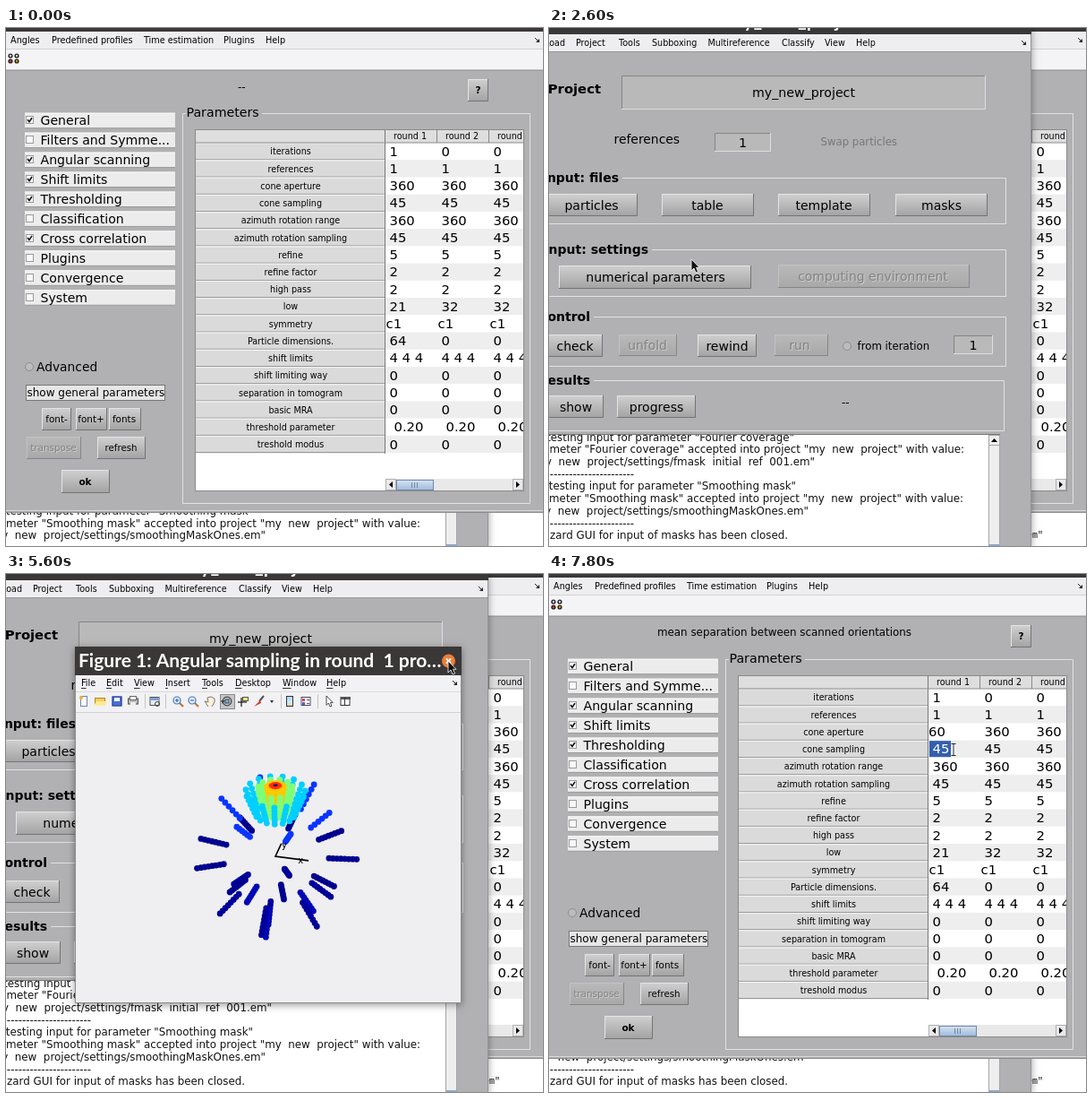
Recreate the animation shown at these times as an HTML page with a canvas. Size 600 px wide and 578 px high, loop 8 s.

```html
<!DOCTYPE html>
<html lang="en">
<head>
<meta charset="utf-8">
<title>Angular sampling</title>
<style>
html, body { margin: 0; width: 100%; height: 100%; overflow: hidden; background: #b1b1b1; }
canvas { display: block; }
</style>
</head>
<body>
<canvas id="stage" width="600" height="578"></canvas>
<script>
const c = document.getElementById('stage').getContext('2d');
const LOOP = 8000, STEP = 200;
const SANS = '"DejaVu Sans", sans-serif', TITLE = 'bold 21px Lato, sans-serif';
const GRAY = '#b1b0b2', BLUE = '#335fae', BAR = '#3a3737', MENU = '#eeedf0';

function box(x, y, w, h, fill) { c.fillStyle = fill; c.fillRect(x, y, w, h); }
function frame(x, y, w, h, color) { c.strokeStyle = color; c.lineWidth = 1; c.strokeRect(x + .5, y + .5, w - 1, h - 1); }
function line(color, width, ...p) {
  c.strokeStyle = color; c.lineWidth = width;
  c.beginPath();
  for (let i = 0; i < p.length; i += 2) c.lineTo(p[i], p[i + 1]);
  c.stroke();
}
function shape(color, ...p) {
  c.fillStyle = color;
  c.beginPath();
  for (let i = 0; i < p.length; i += 2) c.lineTo(p[i], p[i + 1]);
  c.fill();
}
function dot(x, y, r, color) { c.fillStyle = color; c.beginPath(); c.arc(x, y, r, 0, 7); c.fill(); }
function ring(x, y, r, color, width = 1) { c.strokeStyle = color; c.lineWidth = width; c.beginPath(); c.arc(x, y, r, 0, 7); c.stroke(); }
function clip(x, y, w, h, draw) { c.save(); c.beginPath(); c.rect(x, y, w, h); c.clip(); draw(); c.restore(); }
function pane(x, y, w, h, fill) {
  c.save();
  c.shadowColor = 'rgba(0,0,0,.4)'; c.shadowBlur = 8; c.shadowOffsetY = 2;
  box(x, y, w, h, fill);
  c.restore();
}

// y is the visual middle of the line
function text(s, x, y, size, align = 'left', color = '#000', weight = '') {
  c.font = `${weight} ${size}px ${SANS}`;
  c.textAlign = align; c.fillStyle = color;
  c.fillText(s, x, y + size * .36);
}
function button(label, x, y, w, h, size, mid, off, weight) {
  const g = c.createLinearGradient(0, y, 0, y + h);
  g.addColorStop(0, off ? '#b9b9b9' : '#d0d0d0');
  g.addColorStop(1, off ? '#a8a8a8' : '#a2a2a2');
  box(x, y, w, h, g);
  line(off ? '#c2c2c2' : '#e4e4e4', 1, x + .5, y + h, x + .5, y + .5, x + w, y + .5);
  line(off ? '#868686' : '#747474', 1, x + w - .5, y, x + w - .5, y + h - .5, x, y + h - .5);
  if (off) text(label, mid + 1, y + h / 2 + 1, size, 'center', '#cecece');
  text(label, mid, y + h / 2, size, 'center', off ? '#838383' : '#000', weight);
}
function field(label, x, y, w, h) {
  box(x, y, w, h, '#b9b9b9');
  line('#858585', 1, x + .5, y + h, x + .5, y + .5, x + w, y + .5);
  line('#dedede', 1, x + w - .5, y, x + w - .5, y + h - .5, x, y + h - .5);
  text(label, x + w / 2, y + h / 2, 14.2, 'center');
}
function dockArrow(x, y) { line('#222', 1, x - 3, y - 3, x + 1, y + 1); shape('#222', x + 2, y - 2, x + 2, y + 2, x - 2, y + 2); }
function radio(x, y) { dot(x, y, 4.5, '#bcbcbc'); ring(x, y, 4.5, '#8e8e8e'); }

const PANELS = ['General', 'Filters and Symme...', 'Angular scanning', 'Shift limits', 'Thresholding',
  'Classification', 'Cross correlation', 'Plugins', 'Convergence', 'System'];
const CHECKED = [0, 2, 3, 4, 6];
const ROWS = [
  ['iterations', '1', '0'], ['references', '1', '1'], ['cone aperture', '360', '360'], ['cone sampling', '45', '45'],
  ['azimuth rotation range', '360', '360'], ['azimuth rotation sampling', '45', '45'], ['refine', '5', '5'],
  ['refine factor', '2', '2'], ['high pass', '2', '2'], ['low', '21', '32'], ['symmetry', 'c1', 'c1'],
  ['Particle dimensions.', '64', '0'], ['shift limits', '4 4 4', '4 4 4'], ['shift limiting way', '0', '0'],
  ['separation in tomogram', '0', '0'], ['basic MRA', '0', '0'], ['threshold parameter', '0.20', '0.20'],
  ['treshold modus', '0', '0']];
const ROW_H = 19.22;

function paramCell(t, r, col) {
  const y = 137.5 + r * ROW_H, v = ROWS[r][col ? 2 : 1];
  const left = 424 + col * 58;
  if (!col && r === 2 && t >= 7000) {
    const s = t < 7200 ? '360' : t < 7400 ? '6' : '60';
    if (t < 7200) box(425, y - 9, 30, 18, BLUE);
    return text(s, left, y, 14.8, 'left', t < 7200 ? '#fff' : '#000');
  }
  const picked = !col && r === 3 && t >= 7800;
  if (picked) box(425, y - 9, 24, 18, BLUE);
  const pad = v === 'c1' ? .5 : v === '0.20' ? 9.5 : 4.5;
  text(v, left + pad, y, 14.8, 'left', picked ? '#fff' : '#000');
}

function paramTable(t) {
  box(212, 113, 367, 404, '#fff');
  box(212, 114, 366, 14, '#dedede');
  for (let r = 0; r < ROWS.length; r++) {
    const y = 128 + r * ROW_H;
    if (r % 2) box(424, y, 154, ROW_H, '#eeeeee');
    box(212, y, 211, ROW_H, '#dadada');
    line('#f6f6f6', 1, 212, y + .8, 423, y + .8);
    line('#8b8b8b', 1, 212, y + ROW_H - .3, 423, y + ROW_H - .3);
    text(ROWS[r][0], 318, y + 10, 9.6, 'center');
  }
  line('#777', 1, 423.5, 114, 423.5, 475);
  line('#8b8b8b', 1, 212, 128, 578, 128);
  clip(424, 113, 154, 390, () => {
    for (let k = 0; k < 3; k++) {
      text('round ' + (k + 1), 433 + k * 58, 121, 9.6);
      line('#888', 1, 481.5 + k * 58, 114, 481.5 + k * 58, 128);
      for (let r = 0; r < ROWS.length; r++) paramCell(t, r, k);
    }
  });
  box(424, 503, 154, 13, '#e9e9e9');
  const g = c.createLinearGradient(0, 504, 0, 516);
  g.addColorStop(0, '#d8e4f2'); g.addColorStop(1, '#9db9dc');
  box(436, 504, 42, 12, g); frame(436, 504, 42, 12, '#7088a8');
  for (let i = 0; i < 3; i++) line('#7088a8', 1, 453.5 + i * 3, 507, 453.5 + i * 3, 513);
  frame(424, 503, 12, 13, '#b0b0b0'); frame(566, 503, 12, 13, '#b0b0b0');
  shape('#000', 432, 506, 432, 513, 428, 509.5);
  shape('#000', 570, 506, 570, 513, 574, 509.5);
  frame(211, 113, 368, 404, '#8a8a8a');
}

function paramWindow(t) {
  box(0, 0, 600, 541, GRAY);
  box(0, 0, 600, 4, BAR);
  box(0, 4, 600, 19, MENU);
  box(0, 23, 600, 24, '#f4f3f6');
  line('#d2d2d2', 1, 0, 23.5, 600, 23.5);
  line('#8e8e8e', 1, 0, 47, 600, 47);
  [['Angles', 5], ['Predefined profiles', 51], ['Time estimation', 154], ['Plugins', 243], ['Help', 290]]
    .forEach(m => text(m[0], m[1], 13.5, 9.7));
  dockArrow(594, 14);
  for (let k = 0; k < 4; k++) {
    const x = 5 + k % 2 * 7, y = 31 + (k >> 1) * 6;
    dot(x, y, 2.6, '#222'); dot(x, y, 1.2, ['#ddd', '#ddd', '#e33', '#e90'][k]);
  }
  if (t >= 7800) text('mean separation between scanned orientations', 121, 65, 11.86);
  else text('--', 259, 66, 12);
  button('?', 516, 57, 23, 25, 10.5, 527.5, false, 'bold');

  line('#e2e2e2', 1, 201, 95.5, 197.5, 95.5, 197.5, 530.5, 585.5, 530.5, 585.5, 95.5, 286, 95.5);
  text('Parameters', 201.5, 94, 14.2);
  PANELS.forEach((s, i) => {
    const y = 103.2 + i * 21.95;
    box(21, y - 8.5, 168, 17, '#ececec');
    line('#fafafa', 1, 21, y - 8, 189, y - 8);
    line('#999', 1, 21, y + 8.5, 189, y + 8.5);
    box(22, y - 5, 9, 9, '#f8f8f8'); frame(22, Math.round(y) - 5, 9, 9, '#9a9a9a');
    if (CHECKED.includes(i)) line('#111', 1.6, 24, y - 1, 26, y + 1.5, 29, y - 3);
    text(s, 38.5, y, 14.1);
  });
  radio(26, 378);
  text('Advanced', 34, 378, 13.8);
  box(22, 398, 156, 18, '#e6e6e6'); frame(22, 398, 156, 18, '#777');
  text('show general parameters', 23.5, 407, 12);
  button('font-', 40, 424, 33, 25, 10.4, 56.5);
  button('font+', 78, 424, 35, 25, 10.4, 95);
  button('fonts', 115, 424, 36, 25, 10.4, 132);
  button('transpose', 23, 456, 61, 25, 10.4, 53, true);
  button('refresh', 102, 456, 54, 25, 10.2, 128.5);
  button('ok', 62, 493, 54, 26, 10.5, 88.5, false, 'bold');
  paramTable(t);
  line('#d9d9d9', 1, 0, 538.5, 600, 538.5);
  line('#888', 1, 0, 540.5, 600, 540.5);
}

function angleMenu(t, p) {
  if (t < 600 || t >= 2000) return;
  box(0, 5, 43, 18, BLUE);
  text('Angles', 5, 13.5, 9.7, 'left', '#fff');
  const open = t >= 800;
  box(0, 24, 199, 20, '#f4f4f4'); frame(0, 24, 199, 20, '#9a9a9a');
  if (open) box(2, 25, 196, 17, BLUE);
  const ink = open ? '#fff' : '#000';
  text('Show sketch of scanning angles', 19.5, 33.5, 9.7, 'left', ink);
  shape(ink, 191, 30, 191, 37, 195, 33.5);
  if (!open) return;
  box(199, 23, 86, 139, '#fbfbfb'); frame(198, 23, 87, 139, '#9a9a9a');
  const hot = p[0] > 199;
  if (hot) box(200, 25, 84, 17, BLUE);
  for (let i = 0; i < 8; i++) text('round ' + (i + 1), 219, 33.5 + i * 16.9, 9.7, 'left', hot && !i ? '#fff' : '#000');
}

function logText(t) {
  const dash = ['----------------------', 95];
  const lines = [
    ['testing input for parameter "Fourier coverage"', 274],
    ['rameter "Fourier coverage" accepted into project "my  new  project" with value:', 464],
    ['my  new  project/settings/fmask  initial  ref  001.em"', 297], dash,
    ['testing input for parameter "Smoothing mask"', 276],
    ['rameter "Smoothing mask" accepted into project "my  new  project" with value:', 463],
    ['my  new  project/settings/smoothingMaskOnes.em"', 290], dash,
    ['zard GUI for input of masks has been closed.', 267]];
  const shift = t < 1800 ? 2 : 0;
  clip(0, 454, 491, 124, () => lines.forEach((l, i) =>
    text(l[0], l[1], 456.3 + (i + shift) * 13.72, 11.87, 'right', '#111')));
}

function projectWindow(t) {
  pane(0, 0, 539, 578, GRAY);
  box(0, 0, 539, 7, BAR);
  clip(0, 0, 539, 6, () => {
    c.font = TITLE; c.textAlign = 'center'; c.fillStyle = '#fff';
    c.fillText('my_new_project', 277, -1);
  });
  box(0, 7, 539, 19, MENU);
  line('#999', 1, 0, 26.5, 539, 26.5);
  text('Load', 18, 16.5, 9.6, 'right');
  [['Project', 30], ['Tools', 78], ['Subboxing', 115], ['Multireference', 177.5], ['Classify', 260], ['View', 308], ['Help', 343]]
    .forEach(m => text(m[0], m[1], 16.5, 9.6));
  dockArrow(531, 17);
  text('Project', 58, 68, 14.8, 'right', '#000', 'bold');
  field('my_new_project', 81, 53, 407, 38);
  text('references', 72.5, 124, 13.9);
  field('1', 185, 117, 63, 21);
  text('Swap particles', 303.5, 127, 11.7, 'left', '#777');
  [['Input: files', 78, 167, 218, 511], ['Input: settings', 111, 247, 299, 511],
   ['Control', 46, 322, 377, 511], ['Results', 46, 393, 449, 509]].forEach(([s, x, y, b, r]) => {
    line('#e2e2e2', 1, x + 4, y + .5, r - .5, y + .5, r - .5, b + .5, 0, b + .5);
    text(s, x, y, 14, 'right', '#000', 'bold');
  });
  button('particles', -10, 185, 109, 25, 14, 47.5);
  button('table', 126, 185, 103, 25, 14, 177);
  button('template', 256, 185, 103, 25, 14, 307);
  button('masks', 387, 185, 103, 25, 14, 438.5);
  button('numerical parameters', 11, 265, 215, 26, 14, 119);
  button('computing environment', 256, 264, 214, 26, 13.95, 362, true);
  button('check', -10, 342, 70, 25, 14, 29);
  button('unfold', 78, 342, 65, 24, 13.9, 110, true);
  button('rewind', 166, 342, 66, 25, 14, 199);
  button('run', 252, 342, 60, 24, 13.9, 280, true);
  radio(333, 355);
  text('from iteration', 344.5, 355, 11.75);
  field('1', 452, 343, 44, 21);
  button('show', -10, 410, 71, 25, 14, 30);
  button('progress', 76, 410, 88, 25, 14, 120);
  text('--', 327, 418, 12);

  box(0, 453, 491, 125, '#fff');
  line('#777', 1, 0, 453.5, 504, 453.5);
  logText(t);
  box(491, 454, 13, 124, '#eeeeee');
  frame(491, 454, 13, 126, '#a5a5a5');
  frame(491, 454, 13, 12, '#a5a5a5');
  shape('#000', 494, 462, 501, 462, 497.5, 458);
  box(492, 576, 11, 2, '#8fa9cc');
  line('#959595', 1, 538.5, 7, 538.5, 578);
}

// theta, quill count, first azimuth, dots per quill, colour
const RINGS = [
  [175, 1, 187, 8, '#00009a'], [151, 3, 30, 8, '#0008b8'], [135, 6, 30, 8, '#00009a'], [90, 9, 90, 8, '#00008f'],
  [43, 6, 0, 6, '#0a35ff'], [21.5, 15, 90, 6, '#00cfff'], [12.5, 12, 90, 6, '#7dff78'],
  [6, 12, 90, 5, '#ffc800'], [3, 10, 90, 5, '#ff3000'], [0, 1, 0, 6, '#00008f']];
const RAD = Math.PI / 180;

function plot(ox, oy, az, el, R) {
  const se = Math.sin(el * RAD), ce = Math.cos(el * RAD);
  const view = (theta, phi, s) => {
    const r = s * R * Math.sin(theta * RAD), z = s * R * Math.cos(theta * RAD), a = (phi - az) * RAD;
    const x = r * Math.cos(a), y = r * Math.sin(a);
    return { x: ox + x, y: oy - y * se - z * ce, d: z * se - y * ce };
  };
  const dots = [];
  for (const [theta, n, first, m, color] of RINGS)
    for (let k = 0; k < n; k++)
      for (let i = 0; i < m; i++)
        dots.push({ ...view(theta, first + k * 360 / n, .66 + .34 * i / (m - 1)), color });
  dots.sort((a, b) => a.d - b.d);
  const paint = p => dot(p.x, p.y, 3.4, p.color);
  dots.filter(p => p.d < 0).forEach(paint);
  const ax = view(90, 0, .42), ay = view(90, 90, .3);
  line('#000', 1.6, ax.x, ax.y, ox, oy, ay.x, ay.y);
  const lx = view(90, 0, .32), ly = view(90, 90, .27);
  dots.filter(p => p.d >= 0).forEach(paint);
  text('x', lx.x, lx.y + 1, 10, 'center');
  text('y', ly.x + 4, ly.y, 10, 'center');
}

function zoomIcon(x, y, plus) {
  line('#b5793a', 2.2, x + 2, y + 2, x + 6, y + 6);
  dot(x - 1, y - 1, 4, '#dff0ff'); ring(x - 1, y - 1, 4, '#4a76a8', 1.2);
  line('#2255aa', 1, x - 3, y - 1, x + 1, y - 1);
  if (plus) line('#2255aa', 1, x - 1, y - 3, x - 1, y + 1);
}
function spinIcon(x, y) {
  ring(x, y, 4.8, '#444', 1.2);
  box(x - 2, y - 2, 4, 4, '#8cb0dc'); frame(x - 2.5, y - 2.5, 5, 5, '#345');
  shape('#444', x - 7, y - 1, x - 2, y - 1, x - 5, y + 3);
}
function toolIcons(x, y, spin) {
  const at = (dx, w, h, fill, edge) => { box(x + dx - w / 2, y - h / 2, w, h, fill); frame(x + dx - w / 2, y - h / 2, w, h, edge); };
  at(9, 8, 12, '#fff', '#6f86a5'); dot(x + 6, y - 4, 2, '#f2b030');
  at(27, 12, 8, '#f5cf5a', '#b08a20'); shape('#ffe999', x + 23, y, x + 35, y, x + 32, y + 5, x + 20, y + 5);
  at(46, 11, 11, '#4a6fd0', '#26418c'); box(x + 43, y - 4, 6, 4, '#fff');
  at(64, 12, 7, '#b9b9bd', '#555'); box(x + 61, y - 6, 6, 5, '#fff'); frame(x + 60, y - 6, 8, 5, '#666'); box(x + 61, y + 1, 6, 4, '#eee');
  at(88, 11, 10, '#e7edf5', '#555'); box(x + 83, y - 4, 9, 3, '#7aa0d5'); ring(x + 91, y + 3, 2.5, '#444');
  zoomIcon(x + 114, y, true); zoomIcon(x + 131, y, false);
  shape('#fff0dc', x + 145, y, x + 148, y - 5, x + 154, y - 4, x + 155, y + 1, x + 152, y + 6, x + 148, y + 6);
  line('#777', 1, x + 148, y + 6, x + 144, y, x + 148, y + 1, x + 147, y - 4, x + 151, y - 5, x + 155, y - 3, x + 155, y + 1, x + 152, y + 6);
  if (spin) { box(x + 161, y - 8, 17, 17, '#c6c6c8'); frame(x + 161, y - 8, 17, 17, '#8c8c8c'); }
  spinIcon(x + 169, y);
  box(x + 187, y - 5, 6, 5, '#f8e27a'); frame(x + 186, y - 5, 7, 5, '#555'); line('#222', 1.3, x + 181, y + 1, x + 191, y + 1); line('#222', 1.3, x + 185, y - 4, x + 185, y + 6);
  line('#555', 2, x + 210, y - 6, x + 205, y); shape('#d83a20', x + 206, y - 1, x + 207, y + 2, x + 199, y + 6);
  shape('#333', x + 217, y - 1, x + 221, y - 1, x + 219, y + 2);
  const g = c.createLinearGradient(0, y - 6, 0, y + 6);
  g.addColorStop(0, '#a8d8f0'); g.addColorStop(.6, '#cfeaf5'); g.addColorStop(1, '#f0c890');
  at(239, 8, 12, g, '#334');
  at(257, 11, 10, '#fff', '#446');
  for (let k = 0; k < 2; k++) { box(x + 253, y - 3 + k * 4, 3, 3, k ? '#4466dd' : '#d44'); line('#555', 1, x + 258, y - 1.5 + k * 4, x + 261, y - 1.5 + k * 4); }
  arrow(x + 280, y - 6, '#222', '#fff', .8);
  at(301, 11, 10, '#fff', '#333'); box(x + 296, y - 5, 11, 3, '#555'); line('#333', 1, x + 300.5, y - 4, x + 300.5, y + 4);
  for (const s of [77, 100, 229, 270]) line('#c4c4c4', 1, x + s + .5, y - 8, x + s + .5, y + 8);
}

function figure(t) {
  if (t < 3000 || t >= 5800) return;
  const k = Math.min(1, Math.max(0, (t - 3600) / 400));
  const x = Math.round(135 - 57 * k), y = Math.round(128 - 47 * k), spin = t >= 4200;
  pane(x - 1, y, 432, 398, '#efeef0');
  box(x - 1, y, 432, 32, BAR);
  c.font = TITLE; c.textAlign = 'left'; c.fillStyle = '#fff';
  c.fillText('Figure 1: Angular sampling in round  1 pro…', x + 3, y + 23);
  const bx = x + 416.5, by = y + 16;
  dot(bx, by, 7.5, '#ee7c38');
  line('#fff', 1.8, bx - 2.7, by - 2.7, bx + 2.7, by + 2.7);
  line('#fff', 1.8, bx + 2.7, by - 2.7, bx - 2.7, by + 2.7);
  box(x - 1, y + 32, 432, 41, '#f2f1f4');
  [['File', 6], ['Edit', 34], ['View', 65], ['Insert', 100], ['Tools', 141], ['Desktop', 178], ['Window', 231], ['Help', 280]]
    .forEach(([s, dx]) => {
      text(s, x + dx, y + 41, 9.7);
      line('#000', .8, x + dx, y + 46.5, x + dx + c.measureText(s[0]).width, y + 46.5);
    });
  dockArrow(x + 424, y + 41);
  line('#dcdcdc', 1, x, y + 50.5, x + 431, y + 50.5);
  toolIcons(x, y + 61, spin);
  line('#d0d0d0', 1, x, y + 73.5, x + 431, y + 73.5);
  // dragging turns the view by 7 and 61 - 90 degrees every 400 ms
  const turn = Math.min(2, Math.max(0, (t - 4400) / 400));
  const az = Math.round(7 * turn), el = Math.round(90 - 29 * turn);
  plot(x + 223, y + 234, az, el, t < 4400 ? 136 : 91);
  if (t >= 4400 && t < 5400) text(`Az:   ${az} El:   ${el}`, x + 15, y + 387, 9.2);
  line('#8a8a8a', 1, x - .5, y + 32, x - .5, y + 397.5, x + 430.5, y + 397.5, x + 430.5, y + 32);
}

function arrow(x, y, edge = '#fff', fill = '#111', s = 1) {
  const p = [0, 0, 0, 13, 3, 10, 5, 15, 7.5, 14, 5.5, 9.3, 9, 9.3, 0, 0].map((v, i) => (i % 2 ? y : x) + v * s);
  shape(fill, ...p);
  line(edge, .8, ...p);
}

const PATH = [[0, -30, 80], [200, -20, 60], [600, 22, 16], [800, 30, 30], [1000, 46, 36], [1400, 205, 36], [1800, 228, 34],
  [2000, 228, 36], [2600, 159, 258], [3000, 165, 250], [3400, 427, 144], [3600, 427, 144], [4000, 370, 97], [4200, 247, 142],
  [4400, 325, 375], [4800, 318, 331], [5200, 311, 287], [5400, 494, 97], [5600, 494, 97], [6000, 558, 73], [6200, 558, 73],
  [6800, 440, 176], [7400, 440, 176], [7800, 452, 196]];
function pointer(t) {
  const i = PATH.findIndex(p => p[0] > t);
  if (i < 0) return PATH[PATH.length - 1].slice(1);
  const [a, ax, ay] = PATH[i - 1], [b, bx, by] = PATH[i], k = (t - a) / (b - a);
  return [ax + (bx - ax) * k, ay + (by - ay) * k];
}
function cursor(t, [x, y]) {
  if (t >= 3400 && t < 4000) {
    dot(x, y, 5, '#111');
    line('#fff', .8, x - 5, y - 3, x - 2, y - 5, x + 4, y - 4);
  } else if (t >= 4400 && t < 5400) {
    c.setLineDash([2, 1]); ring(x, y, 4.5, '#333'); c.setLineDash([]);
  } else if (t >= 6800) {
    line('#fff', 3, x, y - 6, x, y + 6);
    line('#222', 1, x - 2.5, y - 6.5, x + 2.5, y - 6.5);
    line('#222', 1, x, y - 6, x, y + 6);
    line('#222', 1, x - 2.5, y + 6.5, x + 2.5, y + 6.5);
  } else arrow(x, y);
}

function draw(t) {
  const p = pointer(t);
  box(0, 0, 600, 578, '#fff');
  if (t >= 1800) {
    c.font = '10px "Liberation Mono", monospace'; c.textAlign = 'right'; c.fillStyle = '#111';
    c.fillText('em"', 552, 569);
  }
  if (t >= 2600 && t < 6200) {
    paramWindow(t);
    projectWindow(t);
    figure(t);
  } else {
    projectWindow(t);
    paramWindow(t);
    angleMenu(t, p);
  }
  cursor(t, p);
}

function tick(now) {
  draw(Math.floor(now % LOOP / STEP) * STEP);
  requestAnimationFrame(tick);
}
draw(0);
requestAnimationFrame(tick);
</script>
</body>
</html>
```
